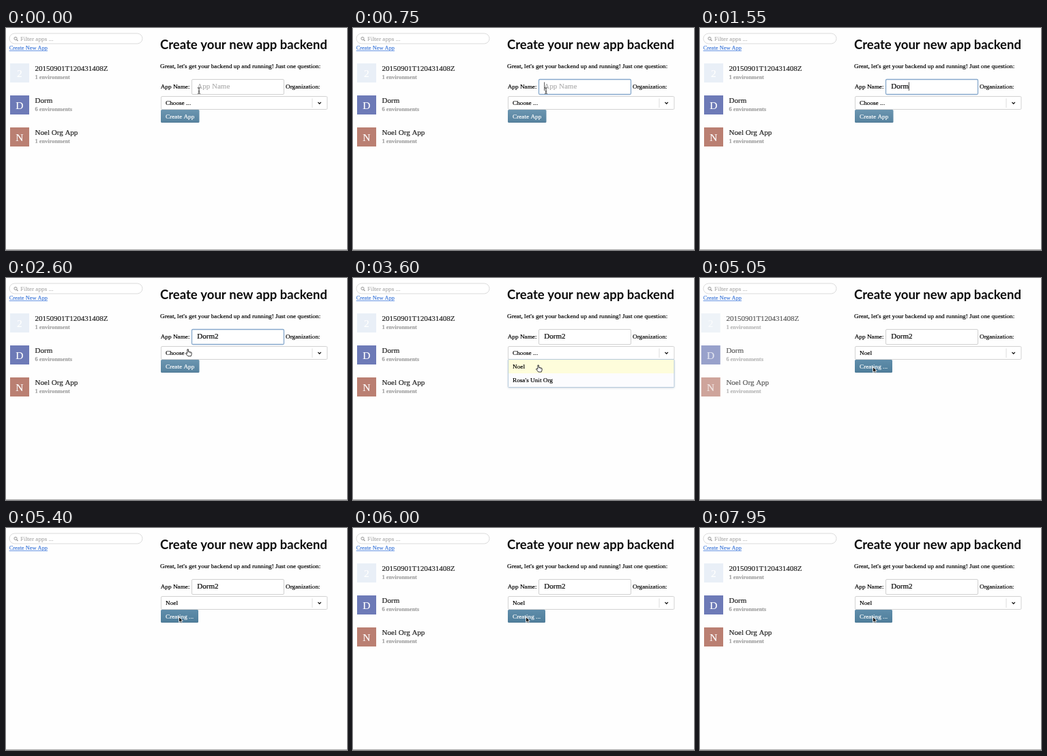
Animation, 500 px wide and 326 px high, one loop 8000 ms. Source, as an HTML page with a canvas:

```html
<!DOCTYPE html>
<html lang="en">
<head>
<meta charset="utf-8">
<title>Create app form</title>
<style>
html, body { margin: 0; width: 100%; height: 100%; overflow: hidden; background: #fefefe; }
canvas { display: block; width: 500px; height: 326px; }
</style>
</head>
<body>
<canvas id="stage"></canvas>
<script>
const W = 500, H = 326, LOOP = 8000;
const canvas = document.getElementById('stage');
const dpr = window.devicePixelRatio || 1;
canvas.width = Math.round(W * dpr);
canvas.height = Math.round(H * dpr);
const ctx = canvas.getContext('2d');

const SERIF = '"Liberation Serif", serif';
const BODY = 9.24, LARGE = 11, SMALL = 8.3;

// Moments of the interaction, in ms
const FOCUS = 500, OPEN = 2850, HOVER = 3450, PICK = 3850, CREATE = 4750;
const LEAVE = [4920, 5280], ENTER = [5400, 5850];
const NAME = 'Dorm2';
const KEYS = [1000, 1150, 1300, 1450, 1900];
const ORGS = ['Noel', 'Rosa\'s Unit Org'];

const APPS = [
  { name: '20150901T120431408Z', note: '1 environment', color: '#e9eff7' },
  { name: 'Dorm', note: '6 environments', color: '#6d7ab7' },
  { name: 'Noel Org App', note: '1 environment', color: '#ba7f72' }
];

// Pointer path: time, x, y
const PATH = [
  [0, 283, 92], [2250, 283, 92], [2600, 266.6, 104.8], [3000, 266.6, 104.8],
  [3350, 269.5, 121], [3450, 269.5, 121], [3600, 271.6, 128],
  [4000, 271.6, 128], [4500, 253.5, 130.5], [LOOP, 253.5, 130.5]
];

const clamp = v => Math.max(0, Math.min(1, v));
const ease = v => v * v * (3 - 2 * v);
const progress = (t, [from, to]) => clamp((t - from) / (to - from));

// A hairline stroke gives the serif text its slightly heavy weight
function text(str, x, y, size, color = '#000', weight = '') {
  ctx.font = `${weight} ${size}px ${SERIF}`;
  ctx.fillStyle = ctx.strokeStyle = color;
  ctx.lineWidth = 0.2;
  ctx.fillText(str, x, y);
  ctx.strokeText(str, x, y);
}

function heading(str, x, y) {
  ctx.font = 'bold 18.55px Lato, sans-serif';
  ctx.fillStyle = '#0c0c0c';
  ctx.fillText(str, x, y);
}

function box(x, y, w, h, r, fill, stroke, line = 1) {
  ctx.beginPath();
  ctx.roundRect(x, y, w, h, r);
  if (fill) { ctx.fillStyle = fill; ctx.fill(); }
  if (stroke) { ctx.strokeStyle = stroke; ctx.lineWidth = line; ctx.stroke(); }
}

function line(points, color, width = 1) {
  ctx.beginPath();
  points.forEach(([x, y]) => ctx.lineTo(x, y));
  ctx.strokeStyle = color;
  ctx.lineWidth = width;
  ctx.stroke();
}

function drawSearch() {
  box(5, 8, 195, 15, 7.5, '#fff', '#d6d6d6', 0.9);
  ctx.beginPath();
  ctx.arc(14, 15.4, 2.1, 0, 7);
  ctx.strokeStyle = '#999';
  ctx.lineWidth = 1;
  ctx.stroke();
  line([[15.5, 17], [17.5, 19]], '#999', 1.2);
  text('Filter apps ...', 21, 19, BODY, '#b0b0b0');
  text('Create New App', 4.7, 32, 8.4, '#4a80dc');
  line([[4.7, 33.5], [61, 33.5]], '#6c98e4');
}

function drawList(t) {
  const shown = t < ENTER[0]
    ? 1 - ease(progress(t, LEAVE))
    : ease(progress(t, ENTER));
  ctx.save();
  ctx.globalAlpha = shown;
  ctx.translate(-14 * (1 - shown), 0);
  APPS.forEach((app, i) => {
    const y = 52 + i * 47;
    ctx.fillStyle = app.color;
    ctx.fillRect(6, y, 28, 28);
    ctx.textAlign = 'center';
    text(app.name[0], 19.8, y + 19.5, 15.5, '#fff');
    ctx.textAlign = 'left';
    text(app.name, 42.6, y + 11, LARGE, '#222');
    text(app.note, 42.6, y + 23, SMALL, '#a2a2a2', 'bold');
  });
  ctx.restore();
}

function drawInput(t) {
  const focused = t >= FOCUS && t < OPEN;
  box(272.5, 75.5, 135, 22, 1.5, '#fff', focused ? '#86a8cc' : '#d0d0d0', focused ? 1.3 : 1);
  const typed = KEYS.filter(k => k <= t);
  const value = NAME.slice(0, typed.length);
  if (value) text(value, 280.3, 89, LARGE);
  else text('App Name', 280.3, 89, LARGE, '#b0b0b0');
  const last = typed.length ? typed[typed.length - 1] : FOCUS;
  if (focused && (t - last) % 1000 < 500) {
    ctx.font = `${LARGE}px ${SERIF}`;
    const x = 280.7 + ctx.measureText(value).width;
    line([[x, 79.5], [x, 92]], '#222', 0.8);
  }
}

function drawSelect(t) {
  box(227.5, 100.5, 243.5, 19, 1.5, '#fff', '#d2d2d2');
  line([[449, 103.5], [449, 117]], '#ddd');
  line([[457.5, 109], [459.7, 111.3], [461.9, 109]], '#222', 1.3);
  text(t < PICK ? 'Choose ...' : ORGS[0], 234, 113, BODY);
}

function drawButton(t) {
  const busy = t >= CREATE;
  const w = busy ? 55 : 56.5;
  const fill = ctx.createLinearGradient(0, 120, 0, 139);
  fill.addColorStop(0, busy ? '#5f8daa' : '#6b95b0');
  fill.addColorStop(1, busy ? '#4f7e9b' : '#57839f');
  box(227, 120, w, 19, 1.5, fill);
  line([[228, 138.5], [226 + w, 138.5]], '#4f7894', 0.8);
  text(busy ? 'Creating ...' : 'Create App', 234, 132.7, BODY, '#fff');
}

function drawMenu(t) {
  if (t < OPEN || t >= PICK) return;
  ctx.save();
  ctx.shadowColor = 'rgba(70, 100, 130, .3)';
  ctx.shadowBlur = 3 * dpr;
  ctx.shadowOffsetY = dpr;
  box(227.5, 119.5, 243.5, 41, 1, '#fcfcfe');
  ctx.restore();
  if (t >= HOVER) {
    ctx.fillStyle = '#fefddb';
    ctx.fillRect(228, 120, 243, 20);
  }
  box(227.5, 119.5, 243.5, 41, 1, null, '#b7cbdc');
  ORGS.forEach((org, i) => text(org, 234, 132.6 + i * 20.2, BODY));
}

function beam() {
  line([[-2, -4.5], [0, -3.7], [2, -4.5]], '#333', 0.9);
  line([[0, -4], [0, 4]], '#333', 1);
  line([[-2, 4.5], [0, 3.7], [2, 4.5]], '#333', 0.9);
  line([[-1.3, 1], [1.3, 1]], '#333', 0.8);
}

function outline(points, fill, stroke) {
  ctx.beginPath();
  points.forEach(([x, y]) => ctx.lineTo(x, y));
  ctx.closePath();
  ctx.lineJoin = 'round';
  ctx.strokeStyle = stroke;
  ctx.lineWidth = 0.9;
  ctx.fillStyle = fill;
  ctx.fill();
  ctx.stroke();
}

function hand() {
  outline([[-0.7, 0], [0.7, 0], [1, 3.6], [2.5, 3.4], [4, 4], [5.4, 4.5],
    [5.6, 7], [4.6, 10], [0.3, 10], [-3, 6.2], [-2.6, 5], [-0.8, 6]], '#fff', '#222');
  line([[2.5, 4], [2.5, 5.5]], '#333', 0.6);
  line([[4, 4.5], [4, 5.8]], '#333', 0.6);
}

function arrow() {
  outline([[0, 0], [0, 8], [1.8, 6.4], [3, 9.2], [4.5, 8.5], [3.3, 5.9], [5.7, 5.8]], '#111', '#eee');
}

function drawPointer(t) {
  if (t >= KEYS[0] && t < PATH[1][0]) return; // hidden while typing
  const i = PATH.findIndex(p => p[0] > t);
  const [t0, x0, y0] = PATH[i - 1], [t1, x1, y1] = PATH[i];
  const k = ease((t - t0) / (t1 - t0));
  const y = y0 + (y1 - y0) * k;
  ctx.save();
  ctx.translate(x0 + (x1 - x0) * k, y);
  if (t >= CREATE) arrow();
  else if (y < 100) beam();
  else hand();
  ctx.restore();
}

function draw(t) {
  ctx.setTransform(dpr, 0, 0, dpr, 0, 0);
  ctx.fillStyle = '#fefefe';
  ctx.fillRect(0, 0, W, H);
  drawSearch();
  drawList(t);
  heading('Create your new app backend', 226, 31);
  text('Great, let\'s get your backend up and running! Just one question:', 226, 59, BODY);
  text('App Name:', 226.7, 89, BODY);
  text('Organization:', 410, 89, BODY);
  drawInput(t);
  drawSelect(t);
  drawButton(t);
  drawMenu(t);
  line([[0, 325.5], [W, 325.5]], '#a9a9a9');
  drawPointer(t);
}

const start = performance.now();
function tick() {
  draw((performance.now() - start) % LOOP);
  requestAnimationFrame(tick);
}
tick();
</script>
</body>
</html>
```
